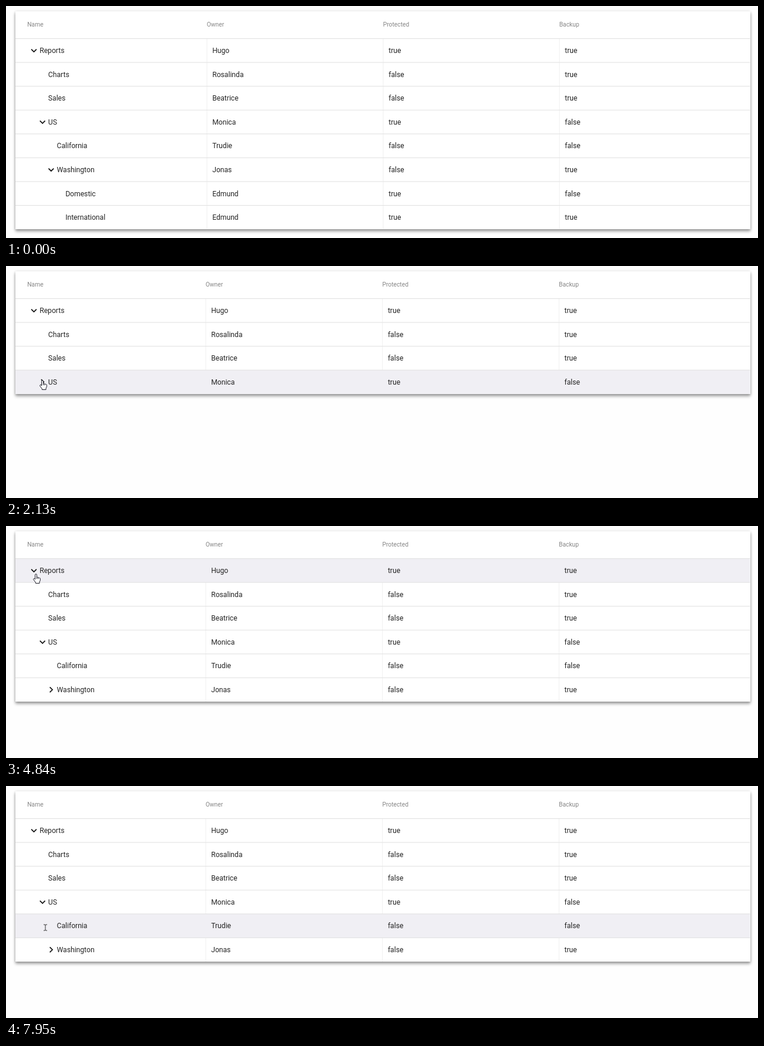
Write an HTML page that moves like this. It is 1280x395 px and loops after 8000 ms.

```html
<!DOCTYPE html>
<html lang="en">
<head>
<meta charset="utf-8">
<title>Tree grid</title>
<style>
  html, body { margin: 0; width: 100%; height: 100%; overflow: hidden; background: #fefefe; }
  #card {
    position: absolute; left: 16px; top: 9px; width: 1250.5px; background: #fff;
    box-shadow: 0 1px 4px rgba(0,0,0,.25), 0 4px 5px rgba(0,0,0,.3);
  }
  svg { position: absolute; left: 0; top: 0; }
  text { font: 12.15px Roboto, sans-serif; fill: #242424; }
  .head { font-size: 10.3px; fill: #868686; }
  .chevron { fill: none; stroke: #111; stroke-width: 1.7; }
  .hand { fill: #fff; stroke: #1c1c28; stroke-width: 1; stroke-linejoin: round; }
  .beam { fill: none; stroke: #333; stroke-width: 1; }
</style>
</head>
<body>
<div id="card"></div>
<svg id="grid" width="1280" height="395"></svg>
<script>
const LOOP = 8000, TOP = 55.5, ROW = 40.57, INDENT = 14.65;
const card = document.getElementById('card'), grid = document.getElementById('grid');

// depth, name, owner, protected, backup, can expand
const rows = [
  [0, 'Reports', 'Hugo', true, true, true],
  [1, 'Charts', 'Rosalinda', false, true],
  [1, 'Sales', 'Beatrice', false, true],
  [1, 'US', 'Monica', true, false, true],
  [2, 'California', 'Trudie', false, false],
  [2, 'Washington', 'Jonas', false, true, true],
  [3, 'Domestic', 'Edmund', true, false],
  [3, 'International', 'Edmund', true, true],
];

// time, visible rows
const layouts = [[0, 8], [2130, 4], [3070, 8], [4000, 6], [5850, 1], [7160, 6]];
const clicks = [[2060, 2130], [2990, 3070], [3930, 4000], [5770, 5850], [7080, 7160]];

// first step, last step, number of steps, target x, target y
const start = [105, 355];
const moves = [
  [520, 1060, 8, 66, 168], [1140, 1290, 3, 62, 189], [1370, 1520, 3, 62, 192],
  [1750, 1830, 2, 62, 195], [3140, 3680, 8, 71, 276], [4230, 4840, 9, 51, 82],
  [4920, 5000, 2, 48, 76], [5230, 5310, 2, 48, 77], [5540, 5620, 2, 49, 78],
  [7560, 7950, 6, 67, 241],
];

const HAND = 'M-1.4 9V1.2a1.4 1.4 0 0 1 2.8 0V5.8a1.3 1.3 0 0 1 2.4.3a1.3 1.3 0 0 1 2 .5' +
  'a1.1 1.1 0 0 1 1.5.9V10.8L6 13V15.5H-.6V14L-4.3 9.2a1.2 1.2 0 0 1 1.8-1.5ZM1.4 5.8V8M3.8 6.2V8.2';
const BEAM = 'M-3-5h2L0-4.4 1-5H3M0-4.4V4.4M-3 5h2L0 4.4 1 5H3';

const text = (x, y, s, cls = '') => `<text x="${x}" y="${y}" class="${cls}">${s}</text>`;
const rect = (x, y, w, h, fill) => `<rect x="${x}" y="${y}" width="${w}" height="${h}" fill="${fill}"/>`;
const path = (d, cls, x, y) => `<path class="${cls}" transform="translate(${x} ${y})" d="${d}"/>`;

function pointerAt(t) {
  let [x, y] = start;
  for (const [from, to, steps, tx, ty] of moves) {
    if (t < from) break;
    const step = Math.floor((t - from) / (to - from) * (steps - 1) + 0.1) + 1;
    const p = Math.min(1, step / steps), e = p * p * (3 - 2 * p);
    x += (tx - x) * e;
    y += (ty - y) * e;
  }
  return [x, y];
}

function draw(t) {
  const count = layouts.filter(([at]) => t >= at).pop()[1];
  const columns = count === 8 ? [342, 642, 942] : [340, 640.7, 941.3];
  const [px, py] = pointerAt(t), shown = t >= 520;
  const hovered = shown ? Math.floor((py - TOP) / ROW) : -1;
  let overButton = false;

  let out = text(36.2, 35.3, 'Name', 'head');
  ['Owner', 'Protected', 'Backup'].forEach((s, i) => out += text(columns[i] - 0.3, 35.3, s, 'head'));

  rows.slice(0, count).forEach(([depth, name, ...cells], i) => {
    const y = TOP + i * ROW, base = y + 24.7, cx = 47.5 + depth * INDENT, cy = y + 20.4;
    const expandable = cells.pop() === true && rows[i].length === 6;
    if (i === hovered) out += rect(16, y, 1250.5, ROW, '#f0eff4');
    else columns.forEach(x => out += rect(x - 0.5, y, 1, ROW, '#f0f0f0'));
    out += rect(16, y - 0.5, 1250.5, 1, '#e0e0e0');
    out += text(57.2 + depth * INDENT, base, name);
    rows[i].slice(2, 5).forEach((s, c) => out += text(columns[c] + 9.2, base, s));
    if (expandable) {
      const open = count > i + 1 ;
      out += path(open ? 'M-4.4-2.2L0 2.2 4.4-2.2' : 'M-2.2-4.4L2.2 0-2.2 4.4', 'chevron', cx, cy);
      if (i === hovered && Math.abs(px - cx) < 11) overButton = true;
    }
  });

  if (shown) out += path(overButton ? HAND : BEAM, overButton ? 'hand' : 'beam', px, py);
  if (clicks.some(([from, to]) => t >= from && t < to))
    out += `<circle cx="${px}" cy="${py}" r="10" fill="#fff200" fill-opacity=".6"/>`;

  card.style.height = TOP + count * ROW - 9 + 'px';
  return out;
}

let last = '';
function tick() {
  const markup = draw(performance.now() % LOOP);
  if (markup !== last) grid.innerHTML = last = markup;
  requestAnimationFrame(tick);
}
tick();
</script>
</body>
</html>
```
